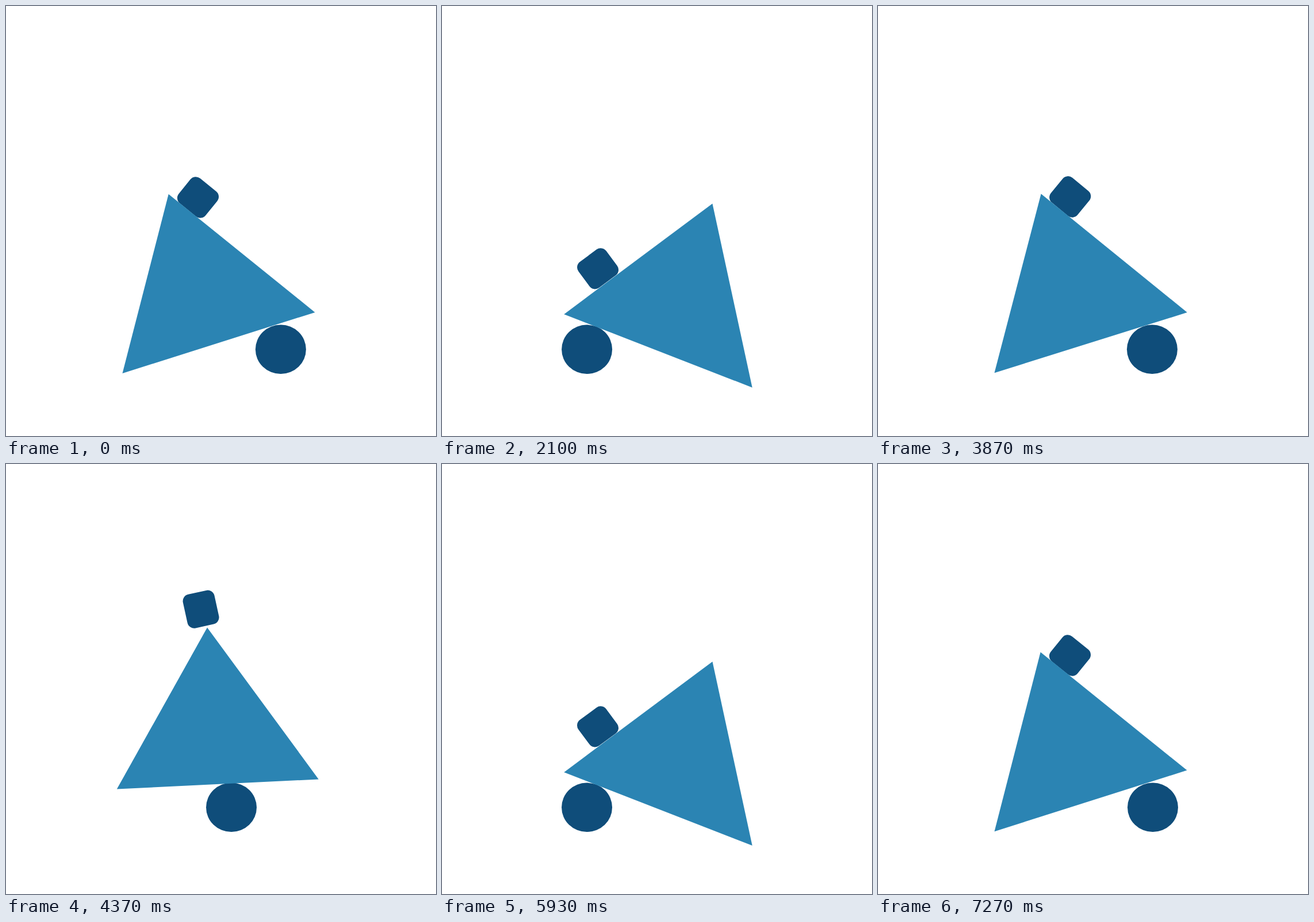
An HTML page that plays this animation: 748 px wide and 748 px high, repeating every 7.63 s.

```html
<!DOCTYPE html>
<html lang="en">
<head>
<meta charset="utf-8">
<title>Balancing shapes</title>
<style>
  html, body { margin: 0; height: 100%; overflow: hidden; background: #fff; }
  svg { display: block; width: 100%; height: 100%; }
</style>
</head>
<body>
<svg viewBox="0 0 748 748">
  <rect id="box" x="-30" y="-28" width="60" height="56" rx="12" fill="#0f4d7a"/>
  <ellipse id="ball" rx="44" ry="42.7" fill="#0f4d7a"/>
  <path id="wedge" d="M-175.7 0H175.7L-5-273Z" fill="#2b84b3"/>
</svg>
<script>
const LOOP = 7630, CYCLE = 3834, LEAD = 12;
const [box, ball, wedge] = ['box', 'ball', 'wedge'].map(id => document.getElementById(id));

// Resting and airborne poses: [x, y, angle]; the wedge is placed by the middle of its base.
const left = { wedge: [370, 586, -17.6], box: [334, 333, 39], ball: 478 };
const right = { wedge: [376, 600, 21.3], box: [271, 457, 143.5], ball: 252 };
const tossLeft = { wedge: [352, 536, 7.9], box: [326, 204.5, 105.5], ball: 330 };
const tossRight = { wedge: [386, 535, -4.2], box: [375, 207, 75], ball: 399 };

// Same curves as the CSS keywords ease-out and ease-in.
function easeOut(x) {
  let lo = 0, hi = 1;
  for (let i = 0; i < 24; i++) {
    const s = (lo + hi) / 2;
    if (1.74 * s * s - 0.74 * s ** 3 < x) lo = s; else hi = s;
  }
  return lo * lo * (3 - 2 * lo);
}
const easeIn = x => 1 - easeOut(1 - x);

// bend holds the control points of the curved paths.
const moves = [
  { start: 0, end: 763, from: left, to: tossLeft, ease: easeIn, bend: { wedge: [379, 561], box: [350, 257] } },
  { start: 763, end: 1335, from: tossLeft, to: right, ease: easeOut, bend: { wedge: [357.4, 568] } },
  { start: 2098, end: 2861, from: right, to: tossRight, ease: easeIn, bend: { wedge: [374, 567.5] } },
  { start: 2861, end: 3434, from: tossRight, to: left, ease: easeOut, bend: { wedge: [368, 560.5] } }
];

const mix = (a, b, p) => a + (b - a) * p;
const curve = (a, c, b, p) => mix(mix(a, c, p), mix(c, b, p), p);

function place(el, name, { from, to, bend }, p) {
  const a = from[name], b = to[name];
  const c = bend[name] || [(a[0] + b[0]) / 2, (a[1] + b[1]) / 2];
  const [x, y] = [0, 1].map(i => curve(a[i], c[i], b[i], p));
  el.setAttribute('transform', `translate(${x} ${y}) rotate(${mix(a[2], b[2], p)})`);
}

function draw(time) {
  const t = (time % LOOP + LEAD) % CYCLE;
  const move = moves.filter(m => t >= m.start).pop();
  const p = move.ease(Math.min(1, (t - move.start) / (move.end - move.start)));
  place(box, 'box', move, p);
  place(wedge, 'wedge', move, p);
  ball.setAttribute('transform', `translate(${mix(move.from.ball, move.to.ball, p)} 597.3)`);
}

const begin = performance.now();
function tick() {
  draw(performance.now() - begin);
  requestAnimationFrame(tick);
}
tick();
</script>
</body>
</html>
```
